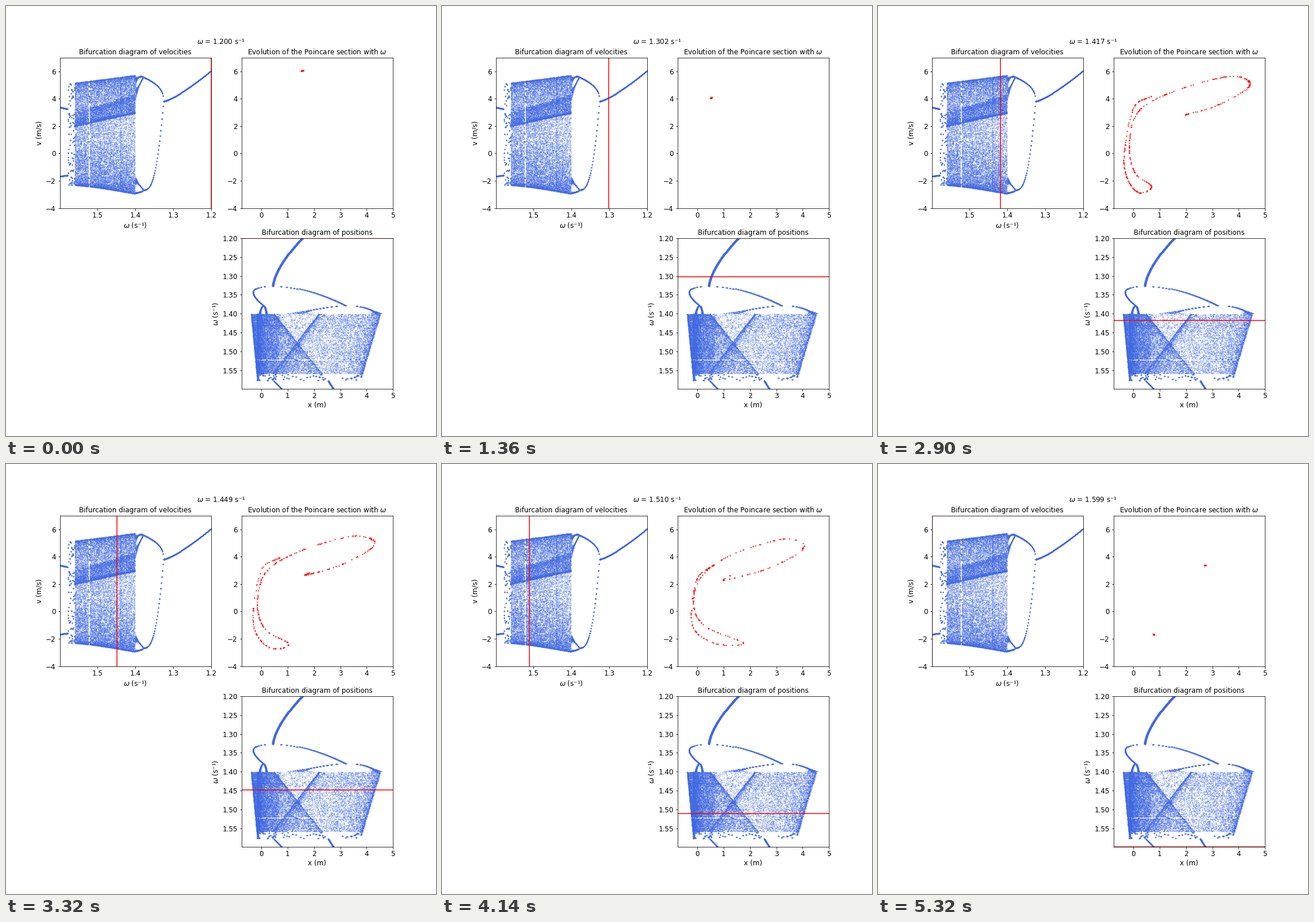
Recreate the animation shown at these times as a matplotlib script. Size 748 px wide and 748 px high, loop 5.34 s.

```python
import numpy as np
import matplotlib.pyplot as plt
from matplotlib.animation import FuncAnimation

plt.rcParams.update({
    "font.family": "DejaVu Sans", "font.size": 12, "axes.titlesize": 12,
    "axes.labelsize": 12, "xtick.labelsize": 12, "ytick.labelsize": 12,
    "xtick.major.pad": 2.5,
})

STEPS = 267
OMEGAS = 1.2 + 0.0015 * np.arange(STEPS)
SPLIT, SPLIT2, CRISIS, CALM, END = 1.3265, 1.3785, 1.4003, 1.5585, 1.5768
rng = np.random.default_rng(4)

# Key points (x, v) of the folded attractor, from its curled end round the
# right tip, down the left side, through the lower lobe and back up.
FOLD_W0, FOLD_W1 = 1.417, 1.542
FOLD_0 = np.array([(2.2, 3), (2.05, 2.88), (3.2, 3.55), (4.43, 5), (3.65, 5.64),
                   (1.6, 4.6), (.2, 3.1), (-.16, .6), (.05, -1.4), (.68, -2.4),
                   (.2, -2.86), (-.24, -1.8), (-.35, 0), (0, 3.35), (.7, 4.2)])
FOLD_1 = np.array([(1.35, 2.95), (.65, 2.1), (2.6, 3.1), (3.88, 4.5), (3.2, 5.2),
                   (1.2, 4), (.1, 2.3), (-.14, .4), (.4, -1), (2.1, -2.25),
                   (.9, -2.2), (-.03, -1.3), (-.19, .1), (0, 2.15), (.6, 3.15)])


def catmull(knots, s):
    """Points on a Catmull-Rom spline at knot parameters s."""
    p = np.vstack([2 * knots[0] - knots[1], knots, 2 * knots[-1] - knots[-2]])
    i = np.minimum(s.astype(int), len(knots) - 2)
    t = (s - i)[:, None]
    a, b, c, d = p[i], p[i + 1], p[i + 2], p[i + 3]
    return b + .5 * t * (c - a + t * (2 * a - 5 * b + 4 * c - d
                                      + t * (3 * (b - c) + d - a)))


def chaos(w, n):
    u = (w - FOLD_W0) / (FOLD_W1 - FOLD_W0)
    knots = FOLD_0 + (FOLD_1 - FOLD_0) * u
    return catmull(knots, rng.uniform(.4, len(knots) - 1, n))


def period_one(w):
    q = 1 - (w - 1.2) / (SPLIT - 1.2)
    return [(.44 + 1.11 * q ** 1.55, 3.8 + 2.25 * q ** 1.3)]


def period_two(w):
    q = (w - SPLIT) / (SPLIT2 - SPLIT)
    return [(.44 + 2.76 * q ** .55, 3.8 + 1.77 * q ** .37),
            (.44 - 2.58 * q ** .5 + 2.22 * q, 3.8 - 6.47 * (1 - (1 - q) ** 2.75))]


def period_four(w):
    r = (w - SPLIT2) / (CRISIS - SPLIT2)
    # The four branches widen into bands towards the crisis.
    r = np.clip(r + max(0, r - .58) * rng.normal(0, .5, 40), 0, 1.2)
    root = np.sqrt(r)
    bands = [(3.2 + 1.25 * r ** .4, 5.57 + .4 * r - .67 * r ** 2),
             (3.2 - 1.95 * r ** .65, 5.57 - 1.27 * r ** 1.2),
             (.08 + .12 * root, -2.67 - .23 * root),
             (.08 - .15 * root, -2.67 + .75 * r)]
    return np.hstack(bands).T


def period_end(w):
    q = (w - END) / (OMEGAS[-1] - END)
    return [(.46 + .31 * q, -1.6 - .08 * q), (2.53 + .2 * q, 3.24 + .13 * q)]


def orbit(w):
    if w < SPLIT:
        return np.repeat(period_one(w), 60, 0)
    if w < SPLIT2:
        return np.repeat(period_two(w), 30, 0)
    if w < CRISIS:
        return period_four(w)
    if w > END:
        return np.repeat(period_end(w), 30, 0)
    if w > CALM or abs(w - 1.5215) < .0013:
        return np.repeat(chaos(w, 7), 20, 0)
    return chaos(w, rng.integers(200, 290))


def section(w):
    """Orbit points, smeared by the finite sampling time."""
    pts = orbit(w)
    dt = rng.uniform(-.0065, .0065, len(pts))
    return np.column_stack([pts[:, 0] + pts[:, 1] * dt, pts[:, 1] + 2.5 * dt])


sections = [section(w) for w in OMEGAS]
cloud = np.vstack(sections)
cloud_w = np.repeat(OMEGAS, [len(s) for s in sections])

fig = plt.figure(figsize=(10.389, 10.389), dpi=72, facecolor="white")
ax_v, ax_p, ax_x = (fig.add_subplot(2, 2, k) for k in (1, 2, 4))
axes = (ax_v, ax_p, ax_x)
W_LABEL = r"$\omega$ (s⁻¹)"
W_LIM = (OMEGAS[-1], OMEGAS[0])
X_LIM, V_LIM = (-.75, 5), (-4, 7)

ax_v.set(title="Bifurcation diagram of velocities", ylabel="v (m/s)",
         xticks=[1.5, 1.4, 1.3, 1.2], yticks=range(-4, 7, 2), xlim=W_LIM, ylim=V_LIM)
ax_p.set(title=r"Evolution of the Poincare section with $\omega$",
         xticks=range(6), yticks=range(-4, 7, 2), xlim=X_LIM, ylim=V_LIM)
ax_x.set(title="Bifurcation diagram of positions", ylabel=W_LABEL,
         xticks=range(6), yticks=np.linspace(1.2, 1.55, 8), xlim=X_LIM, ylim=W_LIM)
ax_v.set_xlabel(W_LABEL, labelpad=3)
ax_x.set_xlabel("x (m)", labelpad=3)

DOT = dict(ls="none", marker="o", mew=0)
BLUE = dict(color="royalblue", ms=1.6, alpha=.4, **DOT)
dots = [ax_v.plot(cloud_w, cloud[:, 1], **BLUE)[0],
        ax_x.plot(cloud[:, 0], cloud_w, **BLUE)[0]]

# Render the fixed parts once and reuse them as a backdrop.
for ax in axes:
    ax.spines[:].set_visible(False)
fig.canvas.draw()
backdrop = np.asarray(fig.canvas.buffer_rgba()).copy()
for d in dots:
    d.remove()
for ax in axes:
    ax.spines[:].set_visible(True)
    for part in (ax.xaxis, ax.yaxis, ax.title, ax.patch):
        part.set_visible(False)
fig.figimage(backdrop, zorder=-1)

v_line = ax_v.axvline(OMEGAS[0], color="red", lw=1.5)
x_line = ax_x.axhline(OMEGAS[0], color="red", lw=1.5)
points, = ax_p.plot([], [], color="red", ms=2.1, **DOT)
label = fig.text(.5, 682 / 748, "", ha="center", va="baseline")


def update(i):
    w = OMEGAS[i]
    v_line.set_xdata([w, w])
    x_line.set_ydata([w, w])
    points.set_data(sections[i].T)
    label.set_text(rf"$\omega$ = {w - 1e-9:.3f} s⁻¹")
    return v_line, x_line, points, label


anim = FuncAnimation(fig, update, frames=STEPS, interval=20, repeat=True)
plt.show()
```
